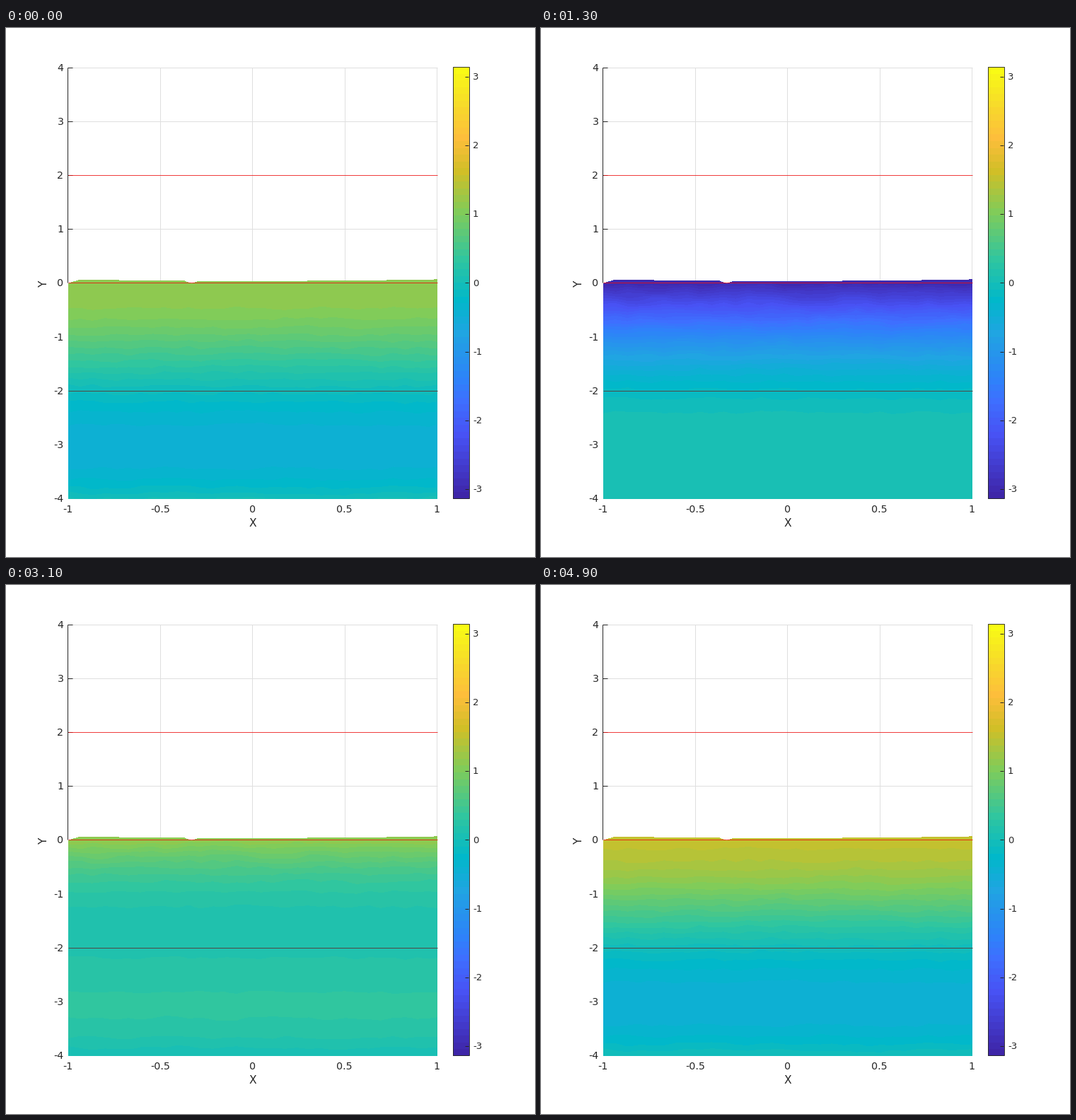
A matplotlib script for the animation above (5 s loop, 748x748 px).

```python
import numpy as np
import matplotlib.pyplot as plt
from matplotlib.animation import FuncAnimation
from matplotlib.colors import LinearSegmentedColormap
from matplotlib.patches import Rectangle

SIZE, DPI = 748, 100
FRAMES, INTERVAL = 50, 100
PERIOD = FRAMES * INTERVAL / 1000
LEFT, RIGHT, TOP, BOTTOM = 88, 610, 354, 666
INK, GRID, RED = "#262626", "#dfdfdf", (.93, .05, .05, .8)
PX = 72 / DPI  # points per pixel

plt.rcParams["font.family"] = "DejaVu Sans"
fig = plt.figure(figsize=(SIZE / DPI, SIZE / DPI), dpi=DPI, facecolor="white")
ax = fig.add_axes([0, 0, 1, 1])


def col(x):
    return 348.3 + 261 * x


def row(y):
    return 360.4 - 76.2 * y


def line(xs, ys, color=INK, width=1.0, z=4):
    ax.plot(xs, ys, color=color, lw=width * PX, zorder=z, solid_capstyle="butt")


def label(x, y, text, size=14.2, ha="center", **kw):
    ax.text(x, y, text, size=size * PX, color=INK, ha=ha, va="center", **kw)


def value_noise(rng, shape, cell_y, cell_x):
    """Random grid values, interpolated linearly to the given shape."""
    h, w = shape
    grid = rng.uniform(-1, 1, (h // cell_y + 2, w // cell_x + 2))
    gx = np.arange(grid.shape[1]) * cell_x
    gy = np.arange(grid.shape[0]) * cell_y
    wide = np.array([np.interp(np.arange(w), gx, r) for r in grid])
    return np.array([np.interp(np.arange(h), gy, c) for c in wide.T]).T


def surface(x):
    """Shallow bowl that pinches to zero at two points."""
    height = .042 + .03 * x**2
    for centre, width in ((-1, .065), (-.33, .04)):
        height = height * np.clip(np.abs(x - centre) / width, 0, 1)
    return height


def main_wave(y):
    return 3.1 * (1 + y / 4) * (1 + y / 2.15) * (1 - .14 * np.sin(np.pi * y / 2.5))


def side_wave(y):
    return .6 * (1 + y / 4) * (1 + y / 1.17)**2


x_grid = (np.arange(LEFT, RIGHT) - col(0)) / 261
y_grid = (row(0) - np.arange(TOP, BOTTOM)[:, None]) / 76.2
air = y_grid > surface(x_grid)
rng = np.random.default_rng(4)
wobble = (.035 * value_noise(rng, air.shape, 9, 17)
          + .03 * value_noise(rng, air.shape, 30, 45))
depth = np.clip(y_grid + wobble, -4, 0)
main, side = main_wave(depth), side_wave(depth)


def field(t):
    # The side wave runs a quarter period ahead of the main one.
    angle = 2 * np.pi * (t - 4.2) / PERIOD
    return np.ma.array(main * np.cos(angle) - side * np.sin(angle), mask=air)


# Grid and left axis
for x in (-.5, 0, .5, 1):
    line([col(x)] * 2, [row(4), row(0)], GRID, z=1)
for y in (1, 3, 4):
    line([LEFT, RIGHT], [row(y)] * 2, GRID, z=1)
line([col(-1)] * 2, [row(4), row(0)], z=2)
for y in range(1, 5):
    line([col(-1), col(-1) + 6.5], [row(y)] * 2, z=2)

# Fluid and reference lines
stops = {0: "#3e26a8", 9: "#4852f4", 14: "#3e6fff", 17: "#2f81fa",
         24: "#20a5e2", 29: "#01b8ca", 35: "#31c69f", 42: "#81cc59",
         48: "#d1bf27", 53: "#febe3c", 58: "#f7dc2a", 63: "#f9fb15"}
cmap = LinearSegmentedColormap.from_list(
    "levels", [(i / 63, c) for i, c in stops.items()], N=64)
levels = dict(cmap=cmap, vmin=-np.pi, vmax=np.pi, aspect="auto",
              interpolation="nearest")
fluid = ax.imshow(field(0), extent=(LEFT, RIGHT, BOTTOM, TOP), zorder=3, **levels)
for y, color in ((2, RED), (0, RED), (-2, "#4f4846")):
    line([LEFT, RIGHT], [row(y)] * 2, color)

# Axis labels
for y in range(-4, 5):
    label(81.5, row(y) + 1, str(y), ha="right")
for x in np.arange(-1, 1.5, .5):
    label(col(x), 681, f"{x:g}")
label(348.5, 700.5, "X", 15.5)
label(54, 361, "Y", 15.5, rotation=90)

# Colour bar
ax.imshow(np.linspace(np.pi, -np.pi, 64)[:, None],
          extent=(632, 655, 666, 55), zorder=2, **levels)
ax.add_patch(Rectangle((632, 55), 22.6, 610, fill=False, ec=INK,
                       lw=.9 * PX, zorder=4))
for v in range(-3, 4):
    y = row(0) - 97.1 * v
    line([649, 654.5], [y] * 2)
    label(660, y + .6, str(v), 13.2, ha="left")

ax.set_xlim(0, SIZE)
ax.set_ylim(SIZE, 0)
ax.axis("off")


def draw(frame):
    fluid.set_data(field(frame * INTERVAL / 1000))
    return fluid,


animation = FuncAnimation(fig, draw, frames=FRAMES, interval=INTERVAL,
                          repeat=True, repeat_delay=0)
plt.show()
```
